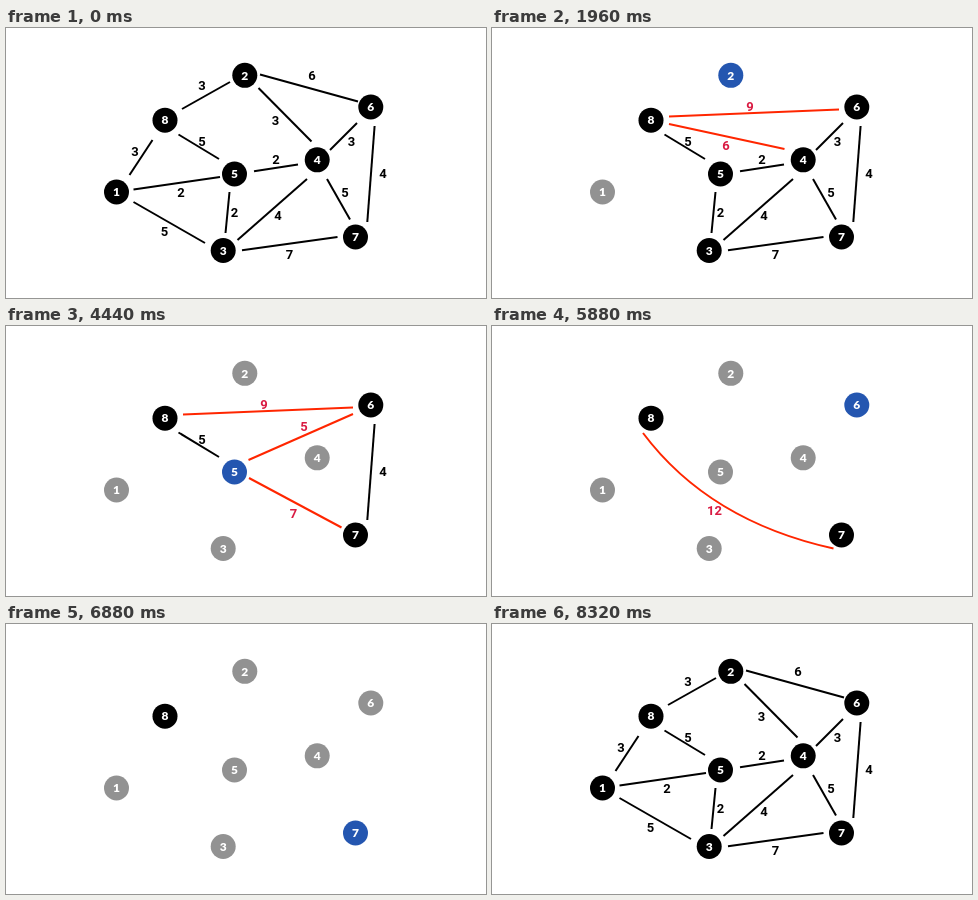
Write an HTML page that moves like this. It is 480 px wide and 270 px high and loops after 8.36 s.

```html
<!DOCTYPE html>
<html lang="en">
<head>
<meta charset="utf-8">
<title>Node contraction</title>
<style>
  html, body { margin: 0; width: 100%; height: 100%; overflow: hidden; background: #fff; }
  svg { display: block; width: 100vw; height: 100vh; }
  text { text-anchor: middle; }
  .node text { font: 900 12px Lato, sans-serif; fill: #fff; }
  .edge path { fill: none; stroke: #000; stroke-width: 2; }
  .edge text { font: 700 13px Roboto, sans-serif; }
  .red path { stroke: #ff2600; }
  .red text { fill: #d91a42; }
</style>
</head>
<body>
<svg viewBox="0 0 480 270"></svg>
<script>
const LOOP = 8360;
const CHANGES = [520, 1000, 1480, 1960, 2480, 2960, 3440, 3920, 4440,
  4920, 5400, 5880, 6360, 6880, 7360, 7840, 8320];

const NODES = [[110.5, 164], [238.8, 47.3], [217.2, 222.5], [311.2, 131.8],
  [228.5, 146], [364.8, 79], [349.5, 209], [159, 92.2]];

// Edges grouped by the node whose contraction removes them:
// path, weight, label centre, and for shortcuts the node that adds them.
const EDGES = {
  1: [
    ["M123.5 147L146.5 112", 3, 129, 123],
    ["M127.5 161.5L214 149", 2, 175, 164],
    ["M127.5 174L199 215", 5, 158.5, 203]
  ],
  2: [
    ["M176 81L224 54", 3, 196, 57],
    ["M254 46.5L352 73.5", 6, 306, 47.5],
    ["M252.5 60L305.5 113.5", 3, 269.5, 92]
  ],
  3: [
    ["M223.5 164L219.5 205", 2, 228.5, 184],
    ["M231.5 212L301 151", 4, 272, 187],
    ["M236 222.3L331.5 209", 7, 283.5, 226]
  ],
  4: [
    ["M248 143.2L292 136.5", 2, 270, 131.5],
    ["M324 122L351 95", 3, 345.5, 113],
    ["M321 151L344 191.5", 5, 339, 164],
    ["M177 96L292.5 121", 6, 234, 117, 2]
  ],
  5: [
    ["M172.5 106.5L213 131", 5, 196, 113],
    ["M242.5 134L347 88", 5, 298, 100, 4],
    ["M243 152L335.5 201.5", 7, 287.5, 187, 4]
  ],
  6: [
    ["M368.6 98L361.3 194", 4, 377, 145.5],
    ["M177 88.5L347 81.5", 9, 258, 78.5, 2]
  ],
  7: [["M151 107Q217 195 341.5 222.5", 12, 222.5, 184, 5]]
};

const svg = document.querySelector("svg");

function add(parent, tag, attrs, text = "") {
  const el = document.createElementNS("http://www.w3.org/2000/svg", tag);
  for (const name in attrs) el.setAttribute(name, attrs[name]);
  el.textContent = text;
  return parent.appendChild(el);
}

const edges = Object.entries(EDGES).flatMap(([node, list]) =>
  list.map(([d, weight, x, y, from = 0]) => {
    const g = add(svg, "g", { class: from ? "edge red" : "edge" });
    add(g, "path", { d });
    add(g, "text", { x, y: y + 4.6 }, weight);
    return { g, start: 2 * from, end: 2 * node };
  }));

const discs = NODES.map(([x, y], i) => {
  const g = add(svg, "g", { class: "node" });
  const disc = add(g, "circle", { cx: x, cy: y, r: 12.5 });
  add(g, "text", { x, y: y + 4.2 }, i + 1);
  return disc;
});

// Each node turns blue, loses its edges, then turns grey.
function draw(phase) {
  for (const { g, start, end } of edges) {
    g.style.display = phase >= start && phase < end ? "" : "none";
  }
  discs.forEach((disc, i) => {
    const blueAt = 2 * i + 1;
    const greyAt = i === 7 ? blueAt + 1 : blueAt + 2;
    disc.style.fill = phase < blueAt ? "#000" : phase < greyAt ? "#2456b0" : "#929292";
  });
}

function frame() {
  const t = performance.now() % LOOP;
  draw(CHANGES.filter(c => c <= t).length % CHANGES.length);
  requestAnimationFrame(frame);
}
frame();
</script>
</body>
</html>
```
